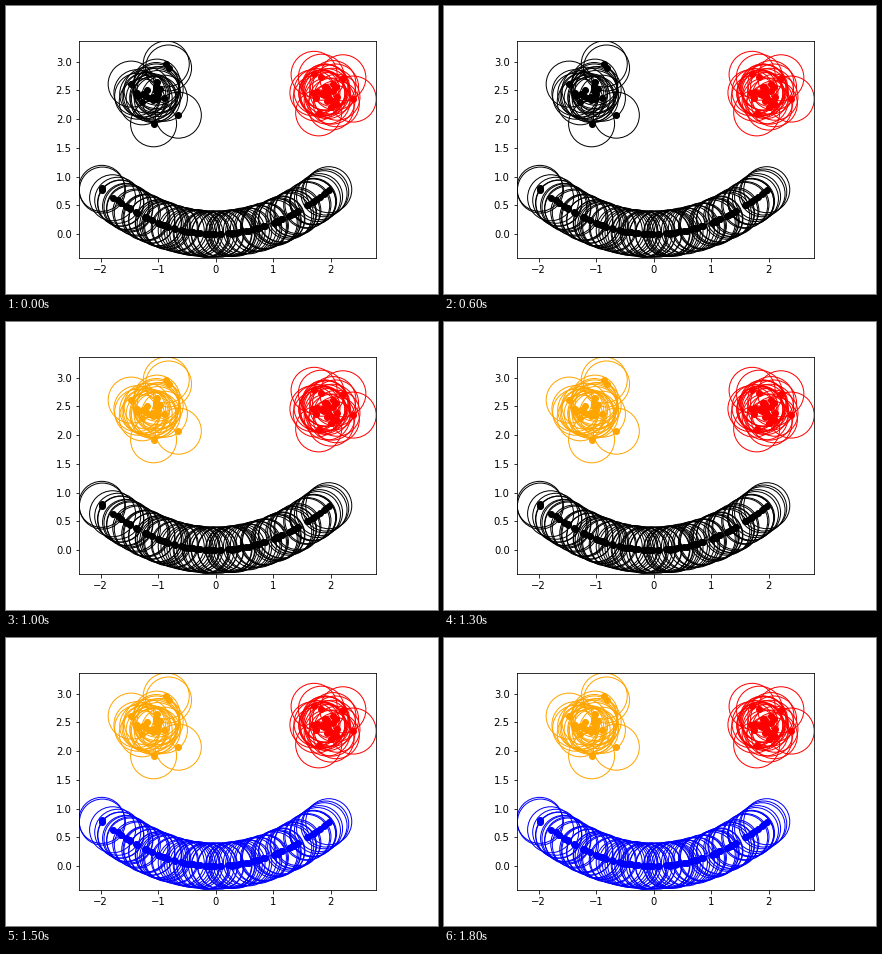
A matplotlib script for the animation above (2000 ms loop, 432x288 px).

```python
import matplotlib.pyplot as plt
import numpy as np
from matplotlib.animation import FuncAnimation
from matplotlib.collections import PatchCollection
from matplotlib.patches import Circle

EPS = 0.4
rng = np.random.default_rng(7)

plt.rcParams.update({"font.family": "DejaVu Sans", "font.size": 10})


def make_eye(center, count, outer):
    """A dense core plus the few points that shape the outline."""
    core = rng.normal(center, 0.13, (count, 2))
    return np.vstack([core, outer])


def make_smile(count):
    """Points along a shallow parabola, with a pair apart at the left end."""
    x = np.linspace(-1.78, 1.98, count) + rng.normal(0, 0.05, count)
    x = np.append(np.clip(x, -1.8, 1.99), [-1.982, -1.97])
    return np.column_stack([x, x**2 / 5 + rng.normal(0, 0.006, x.size)])


left_eye = make_eye((-1.03, 2.47), 19, [
    (-1.47, 2.61), (-1.37, 2.46), (-0.86, 2.96), (-0.82, 2.89),
    (-1.08, 1.92), (-0.65, 2.07)])
right_eye = make_eye((1.92, 2.47), 20, [
    (1.71, 2.78), (2.21, 2.72), (2.39, 2.35), (1.79, 2.11), (1.69, 2.46)])
smile = make_smile(78)

fig, ax = plt.subplots(figsize=(6, 4), dpi=72, facecolor="white")
fig.subplots_adjust(left=0.125, right=0.9, bottom=0.125, top=0.88)
ax.set_aspect("equal")
ax.set_xlim(-2.382, 2.788)
ax.set_ylim(-0.413, 3.367)
ax.set_xticks(range(-2, 3))
ax.set_yticks(np.arange(0, 3.1, 0.5))


def add_cluster(points, color):
    dots = ax.scatter(*points.T, s=36, color=color, linewidth=1)
    rings = PatchCollection([Circle(p, EPS) for p in points],
                            facecolor="none", edgecolor=color, linewidth=1)
    ax.add_collection(rings, autolim=False)
    return dots, rings


def paint(cluster, color):
    dots, rings = cluster
    dots.set_color(color)
    rings.set_edgecolor(color)


smile_art = add_cluster(smile, "black")
left_art = add_cluster(left_eye, "black")
right_art = add_cluster(right_eye, "red")


def update(i):
    paint(left_art, "orange" if i >= 2 else "black")
    paint(smile_art, "blue" if i >= 3 else "black")
    return [*left_art, *smile_art]


anim = FuncAnimation(fig, update, frames=4, interval=500,
                     repeat=True, repeat_delay=0, blit=False)
plt.show()
```
